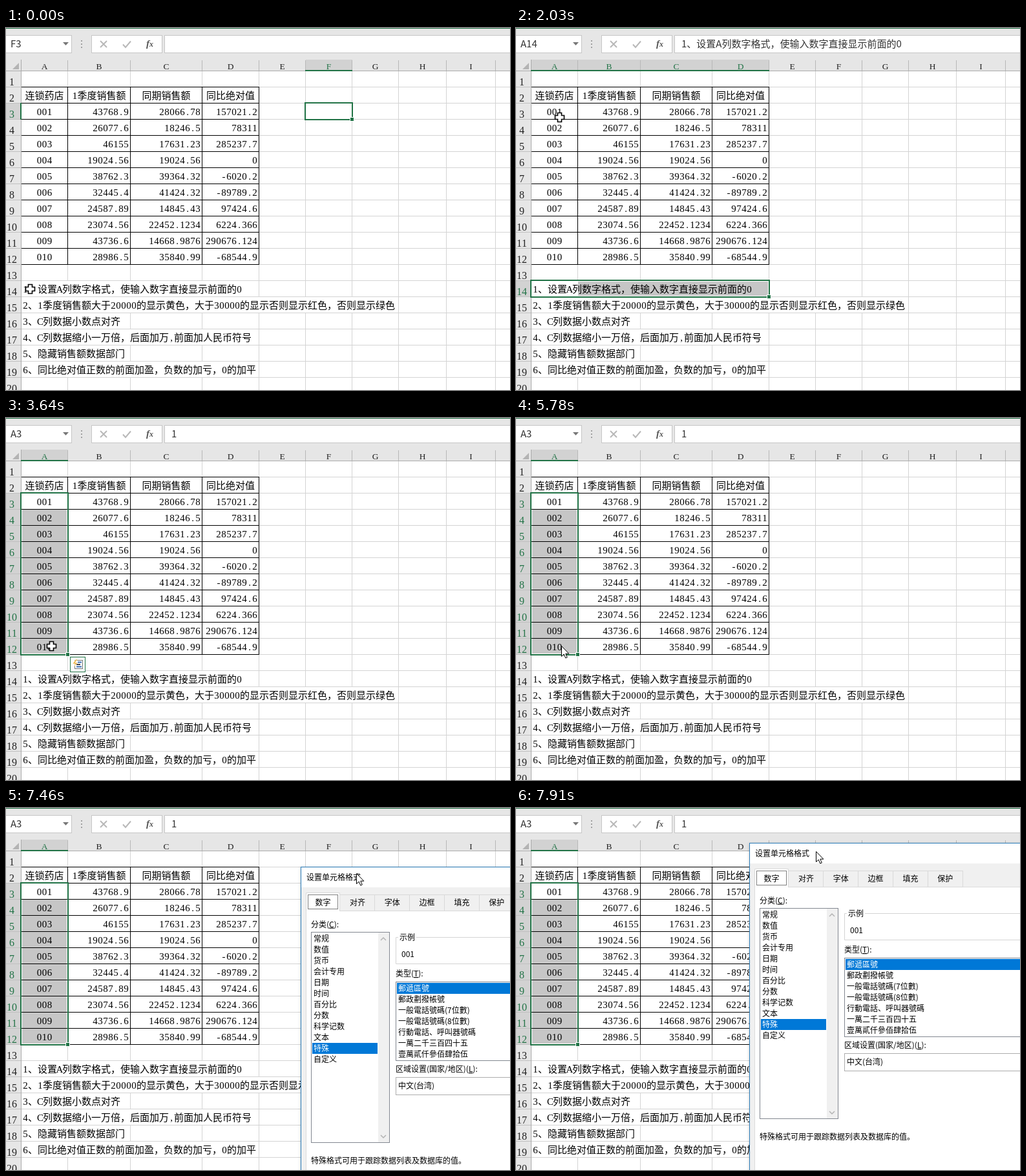
Animation of 780 by 561 pixels, one loop 7.99 s. Source, as an HTML page:

```html
<!DOCTYPE html>
<html lang="zh-CN">
<head>
<meta charset="utf-8">
<title>设置单元格格式</title>
<style>
  html, body { margin: 0; width: 100%; height: 100%; overflow: hidden; background: #fff; }
  svg { display: block; }
  text { white-space: pre; }
  .cell { font: 300 15px "Liberation Serif", "Noto Sans CJK SC", "Noto Sans CJK", serif; text-anchor: middle; }
  .head { fill: #222; }
  .num { font-size: 16px; }
  .letter { font-size: 13.5px; }
  .bar { font: 15px "Noto Sans CJK SC", "Noto Sans CJK", sans-serif; fill: #333; }
  .ui { font: 12px "Noto Sans CJK SC", "Noto Sans CJK", sans-serif; }
  .u { text-decoration: underline; }
  .mid { text-anchor: middle; }
  .inv { fill: #fff; }
  .box { fill: #fff; stroke: #c6c6c6; }
  .on > rect { fill: #d2d2d2; }
  .on > .edge { fill: #217346; }
  .on > .head { fill: #217346; }
  .edge { fill: none; }
  .line { fill: none; stroke: #d4d4d4; }
  .dots { fill: none; stroke-dasharray: 1 1; }
  .shadow { filter: drop-shadow(0 1px 2px rgba(0, 0, 0, .2)); }
</style>
</head>
<body>
<svg id="stage" width="780" height="561" viewBox="0 0 780 561"></svg>
<script>
const LOOP = 7990;
const GREEN = '#217346';
const LETTERS = 'ABCDEFGHI';
const colX = [23, 95, 192, 303, 391, 463, 535, 607, 681, 757];
const rowY = r => 41 + 25 * r;

const table = `连锁药店 1季度销售额 同期销售额 同比绝对值
001 43768.9 28066.78 157021.2
002 26077.6 18246.5 78311
003 46155 17631.23 285237.7
004 19024.56 19024.56 0
005 38762.3 39364.32 -6020.2
006 32445.4 41424.32 -89789.2
007 24587.89 14845.43 97424.6
008 23074.56 22452.1234 6224.366
009 43736.6 14668.9876 290676.124
010 28986.5 35840.99 -68544.9`.split('\n').map(row => row.split(' '));

const notes = [
  '1、设置A列数字格式，使输入数字直接显示前面的0',
  '2、1季度销售额大于20000的显示黄色，大于30000的显示否则显示红色，否则显示绿色',
  '3、C列数据小数点对齐',
  '4、C列数据缩小一万倍，后面加万,前面加人民币符号',
  '5、隐藏销售额数据部门',
  '6、同比绝对值正数的前面加盈，负数的加亏，0的加平'
];

// Worksheet text sits on a fixed pitch: 8px for Latin, 15px for CJK.
const pitch = ch => ch.charCodeAt(0) < 128 ? 8 : 15;
const widthOf = s => [...s].reduce((sum, ch) => sum + pitch(ch), 0);

function gridText(s, x, y, align = 0, cls = '') {
  let left = x - widthOf(s) * align;
  const xs = [...s].map(ch => {
    const centre = left + pitch(ch) / 2;
    left += pitch(ch);
    return centre;
  });
  return `<text class="cell ${cls}" x="${xs.join(' ')}" y="${y}">${s}</text>`;
}

const rect = (x, y, w, h, attrs = '') =>
  `<rect x="${x}" y="${y}" width="${w}" height="${h}" ${attrs}/>`;
const path = (d, attrs = '') => `<path d="${d}" ${attrs}/>`;
const ui = (s, x, cy, cls = '') =>
  `<text class="ui ${cls}" x="${x}" y="${cy + 4.5}">${s.replace(/_(.)/, '<tspan class="u">$1</tspan>')}</text>`;

function gridLines() {
  let d = '';
  for (let r = 1; r <= 20; r++) {
    const note = notes[r - 14];
    const spill = note ? 26 + widthOf(note) : 0;
    d += `M24 ${rowY(r) + 25.5}H780`;
    for (const x of colX.slice(1)) if (x > spill) d += `M${x + .5} ${rowY(r)}v25`;
  }
  return path(d, 'class="line"');
}

function cells() {
  let out = '';
  table.forEach((row, i) => row.forEach((s, c) => {
    const y = rowY(i + 2) + 19;
    const centred = !i || !c;
    out += centred
      ? gridText(s, (colX[c] + colX[c + 1] + 1) / 2, y, .5)
      : gridText(s, colX[c + 1] - 2, y, 1);
  }));
  notes.forEach((s, i) => out += gridText(s, 26, rowY(14 + i) + 19));
  return out;
}

function tableBorders() {
  let d = '';
  for (let r = 2; r <= 13; r++) d += `M23 ${rowY(r) + .5}H392`;
  for (const x of colX.slice(0, 5)) d += `M${x + .5} 91V367`;
  return path(d, 'stroke="#000"');
}

function headers() {
  let out = rect(0, 49, 780, 18, 'fill="#e6e6e6"') + rect(0, 66, 23, 495, 'fill="#e6e6e6"');
  out += path('M20 54V64H10Z', 'fill="#b4b4b4"');
  out += path('M0 66.5H780M23.5 49V561', 'stroke="#ababab"');
  [...LETTERS].forEach((ch, c) => {
    const x = colX[c], w = colX[c + 1] - x;
    out += `<g data-col="${c}">` + rect(x + 1, 49, w, 17, 'fill="#e6e6e6"') +
      path(`M${x + w + .5} 50v16`, 'stroke="#b8b8b8"') +
      gridText(ch, x + w / 2 + .5, 63.5, .5, 'head letter') + rect(x, 65, w + 1, 2, 'class="edge"') + '</g>';
  });
  for (let r = 1; r <= 20; r++) {
    const y = rowY(r);
    out += `<g data-row="${r}">` + rect(0, y + 1, 23, 24, 'fill="#e6e6e6"') +
      path(`M0 ${y + 25.5}h23`, 'stroke="#c0c0c0"') +
      gridText(String(r), 9, y + 23, .5, 'head num') + rect(22, y, 2, 26, 'class="edge"') + '</g>';
  }
  return out;
}

function formulaBar() {
  return rect(0, 0, 780, 49, 'fill="#e6e6e6"') + rect(0, 0, 780, 1, `fill="${GREEN}"`) +
    rect(-1.5, 11.5, 103, 27, 'class="box"') +
    rect(132.5, 11.5, 109, 27, 'class="box"') +
    rect(245.5, 11.5, 540, 27, 'class="box"') +
    path('M88 22h9l-4.5 5z', 'fill="#777"') +
    path('M116 19h2v2h-2zM116 24h2v2h-2zM116 29h2v2h-2z', 'fill="#a0a0a0"') +
    path('M146 20l10 10M156 20l-10 10M181 25.500l4 4.500 8-9.500', 'fill="none" stroke="#b8b8b8" stroke-width="2"') +
    '<text x="217" y="29" font-family="Liberation Serif, serif" font-size="15" font-style="italic" font-weight="bold" fill="#555">f<tspan font-size="12">x</tspan></text>' +
    '<text id="name" class="bar" x="7" y="30"></text><text id="formula" class="bar" x="256" y="30"></text>';
}

function quickButton() {
  return '<g id="quick">' + rect(99.5, 370.5, 23, 23, `fill="#fff" stroke="${GREEN}"`) +
    rect(106.5, 375.5, 12, 13, 'fill="#fff" stroke="#777"') +
    path('M111 378.500h6M109 385.500h8', 'stroke="#3c6eb4" stroke-width="2"') +
    path('M109 382h6', 'stroke="#444" stroke-width="2"') +
    path('M108 374l-5 7h4l-3 6 7-8h-4l4-5z', 'fill="#f0b84a" stroke="#fff" stroke-width=".6"') + '</g>';
}

function listItems(items, x, top, picked, w) {
  return items.map((s, i) => {
    const cy = top + 17 * i;
    return i === picked
      ? rect(x - 2, cy - 8.5, w, 17, 'fill="#0078d7"') + ui(s, x, cy, 'inv')
      : ui(s, x, cy);
  }).join('');
}

function dialog() {
  const kinds = '常规 数值 货币 会计专用 日期 时间 百分比 分数 科学记数 文本 特殊 自定义'.split(' ');
  const types = '郵遞區號 郵政劃撥帳號 一般電話號碼(7位數) 一般電話號碼(8位數) 行動電話、呼叫器號碼 一萬二千三百四十五 壹萬貳仟參佰肆拾伍'.split(' ');
  let out = rect(361, 54, 600, 620, 'class="shadow" fill="#fff"') +
    rect(361.5, 54.5, 600, 620, 'fill="#f0f0f0" stroke="#2b7cb8"') +
    rect(362, 55, 600, 31, 'fill="#fff"') + ui('设置单元格格式', 370, 70) +
    rect(369.5, 122.5, 590, 600, 'fill="#fff" stroke="#dcdcdc"');
  ['对齐', '字体', '边框', '填充', '保护'].forEach((s, i) => {
    out += rect(421.5 + 54 * i, 97.5, 54, 25, 'fill="#f0f0f0" stroke="#d9d9d9"') +
      ui(s, 449 + 53.8 * i, 109, 'mid');
  });
  out += path('M369.500 123V94.500H421.500V123', 'fill="#fff" stroke="#d9d9d9"') +
    rect(372.5, 97.5, 46, 22, 'class="dots" stroke="#000"') + ui('数字', 395.5, 109, 'mid');

  out += ui('分类(_C):', 377, 143) +
    rect(377.5, 155.5, 121, 326, 'fill="#fff" stroke="#828790"') +
    rect(481, 156, 17, 325, 'fill="#f0f0f0"') +
    path('M485 168l4-4 4 4M485 470l4 4 4-4', 'fill="none" stroke="#b4b4b4" stroke-width="1.500"') +
    listItems(kinds, 381, 165.5, 10, 101);

  out += path('M512 163.500H508.500V204.500H800M540 163.500H800', 'class="line"') +
    ui('示例', 514, 163.5) + ui('001', 517, 189.5) + ui('类型(_T):', 508, 219.5) +
    rect(508.5, 232.5, 400, 122, 'fill="#fff" stroke="#828790"') +
    listItems(types, 512, 242.5, 0, 390) +
    ui('区域设置(国家/地区)(_L):', 508, 367.5) +
    rect(508.5, 380.5, 400, 27, 'fill="#fff" stroke="#adadad"') + ui('中文(台湾)', 512, 393.5) +
    ui('特殊格式可用于跟踪数据列表及数据库的值。', 377, 509.5);
  return `<g id="dialog">${out}</g>`;
}

const stage = document.getElementById('stage');
stage.innerHTML = rect(0, 0, 780, 561, 'fill="#fff"') +
  '<rect id="fill" fill="#c6c6c6"/><rect id="active" fill="#fff"/>' +
  gridLines() + cells() + tableBorders() + headers() + formulaBar() +
  `<rect id="frame" fill="none" stroke="${GREEN}" stroke-width="2"/>` +
  `<g id="handle">${rect(-3, -3, 7, 7, 'fill="#fff"') + rect(-2, -2, 5, 5, `fill="${GREEN}"`)}</g>` +
  quickButton() + dialog() +
  path('M-3 -7h6v4h4v6h-4v4h-6v-4h-4v-6h4z', 'id="cross" fill="#fff" stroke="#000" stroke-width="1.600"') +
  path('M0 0V16L3.700 12.600 6.300 18.500 8.800 17.400 6.300 11.700H11.300Z', 'id="arrow" fill="#fff" stroke="#000"');

const el = id => document.getElementById(id);
const set = (id, attrs) => { for (const k in attrs) el(id).setAttribute(k, attrs[k]); };
const show = (id, on) => set(id, { visibility: on ? 'visible' : 'hidden' });

const linear = p => p;
const easeIn = p => p * p;
const easeOut = p => 1 - (1 - p) ** 2;
const easeBoth = p => p * p * (3 - 2 * p);

// Each move: first step, last step, number of steps, x, y, easing.
const pointerMoves = [
  [80, 860, 9, 132, 405, easeIn],
  [930, 1240, 5, 339, 405, linear],
  [1380, 2110, 10, 64, 136, easeOut],
  [2190, 2950, 10, 66, 235, easeIn],
  [3010, 3350, 5, 70, 354, easeOut],
  [6260, 6970, 10, 706, 165, easeBoth],
  [7120, 7120, 1, 700, 160, linear],
  [7220, 7460, 4, 542, 102, linear],
  [7540, 7910, 6, 464, 68, easeOut]
];
const dialogMoves = [
  [7220, 7460, 4, 95, 37, linear],
  [7540, 7910, 6, 0, 0, easeOut]
];

function follow(moves, x, y, t) {
  for (const [from, to, n, tx, ty, ease] of moves) {
    if (t < from) break;
    const step = to > from ? Math.min(n - 1, Math.floor((t - from) / (to - from) * (n - 1) + 1e-6)) : n - 1;
    const p = ease((step + 1) / n);
    x += (tx - x) * p;
    y += (ty - y) * p;
  }
  return [Math.round(x), Math.round(y)];
}

function selection(t, x, y) {
  if (t < 270) return { c: 5, r: 3, cols: 1, rows: 1, text: '' };
  if (t < 2440) {
    const cols = t < 1380 ? colX.findIndex(edge => edge > x) : 4;
    return { c: 0, r: 14, cols, rows: 1, text: notes[0], drag: t < 1380 };
  }
  const rows = t < 3550 ? Math.max(1, Math.floor((y - 41) / 25) - 2) : 10;
  return { c: 0, r: 3, cols: 1, rows, text: '1', drag: t < 3550 };
}

function drawSelection({ c, r, cols, rows, text, drag }) {
  const x = colX[c], y = rowY(r);
  const right = colX[c + cols], bottom = rowY(r + rows);
  const many = cols * rows > 1;
  set('fill', { x: x + 2, y: y + 2, width: right - x - 3, height: bottom - y - 3 });
  set('active', { x: x + 1, y: y + 1, width: colX[c + 1] - x, height: 25 });
  set('frame', { x, y, width: right - x + 1, height: bottom - y + 1 });
  set('handle', { transform: `translate(${right} ${bottom})` });
  el('name').textContent = drag && many ? `${rows}R x ${cols}C` : LETTERS[c] + r;
  el('formula').textContent = text;
  stage.querySelectorAll('[data-col]').forEach(g =>
    g.classList.toggle('on', g.dataset.col >= c && g.dataset.col < c + cols));
  stage.querySelectorAll('[data-row]').forEach(g =>
    g.classList.toggle('on', g.dataset.row >= r && g.dataset.row < r + rows));
}

function draw(t) {
  const [x, y] = follow(pointerMoves, 37, 405, t);
  drawSelection(selection(t, x, y));

  const arrow = t >= 5780;
  show('cross', !arrow);
  show('arrow', arrow);
  set('cross', { transform: `translate(${x + .5} ${y - .5})` });
  set('arrow', { transform: `translate(${x + .5} ${y - .5})` });
  show('quick', t >= 3640 && t < 4760);

  const [dx, dy] = follow(dialogMoves, 241, 95, t);
  const fade = Math.min(4, Math.max(0, Math.floor((t - 5780) / 85))) / 4;
  show('dialog', fade > 0);
  set('dialog', { transform: `translate(${dx} ${dy})`, opacity: easeOut(fade) });
}

const start = performance.now();
function tick(now) {
  draw(Math.max(0, now - start) % LOOP);
  requestAnimationFrame(tick);
}
draw(0);
requestAnimationFrame(tick);
</script>
</body>
</html>
```
